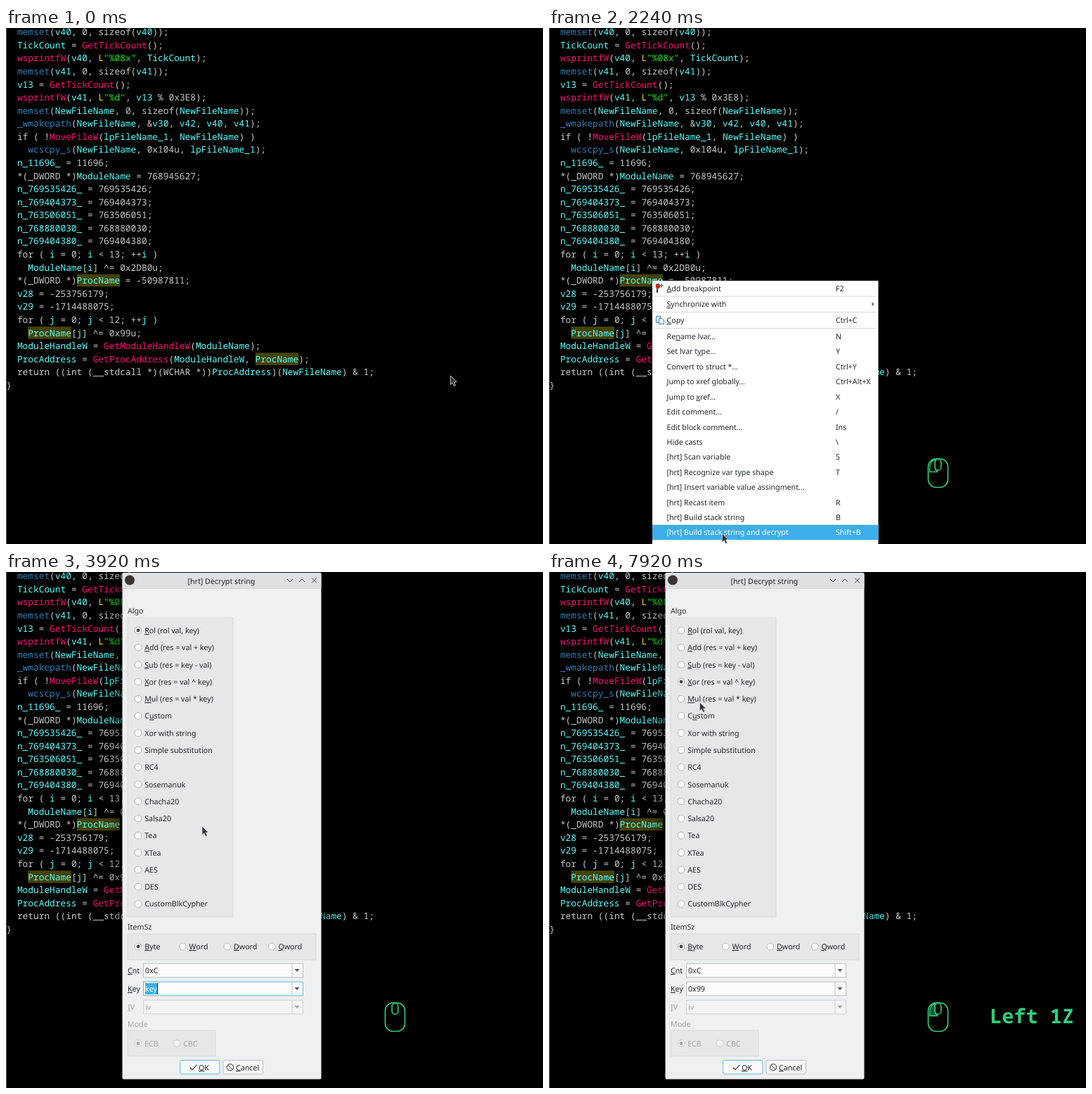
Write an HTML page that moves like this. It is 764 px wide and 733 px high and loops after 8 s.

```html
<!DOCTYPE html>
<html lang="en">
<head>
<meta charset="utf-8">
<title>Decrypt a stack string</title>
<style>
html, body { margin: 0; width: 100%; height: 100%; overflow: hidden; background: #000; }
svg { display: block; }
text { white-space: pre; font: 10.66px "Noto Sans", sans-serif; text-rendering: geometricPrecision; }
.code { font: 12.84px "Noto Sans Mono", monospace; }
.keys { font: bold 28.5px "Noto Sans Mono", monospace; }
.u { text-decoration: underline; }
.win { filter: drop-shadow(0 4px 12px rgba(0, 0, 0, .9)); }
</style>
</head>
<body>
<svg id="stage" width="764" height="733" viewBox="0 0 764 733"></svg>
<script>
const LOOP = 8000, STEP = 80;
const INK = '#232629', DIM = '#a3a5a7', BLUE = '#3daee9', EDGE = '#62b9e8', GREEN = '#2fd07c';
const CHAR = 7.704, LINE = 18.58, BASE = 10.2, LEFT = 0.5;

const source = `  memset(v40, 0, sizeof(v40));
  TickCount = GetTickCount();
  wsprintfW(v40, L"%08x", TickCount);
  memset(v41, 0, sizeof(v41));
  v13 = GetTickCount();
  wsprintfW(v41, L"%d", v13 % 0x3E8);
  memset(NewFileName, 0, sizeof(NewFileName));
  _wmakepath(NewFileName, &v30, v42, v40, v41);
  if ( !MoveFileW(lpFileName_1, NewFileName) )
    wcscpy_s(NewFileName, 0x104u, lpFileName_1);
  n_11696_ = 11696;
  *(_DWORD *)ModuleName = 768945627;
  n_769535426_ = 769535426;
  n_769404373_ = 769404373;
  n_763506051_ = 763506051;
  n_768880030_ = 768880030;
  n_769404380_ = 769404380;
  for ( i = 0; i < 13; ++i )
    ModuleName[i] ^= 0x2DB0u;
  *(_DWORD *)ProcName = -50987811;
  v28 = -253756179;
  v29 = -1714488075;
  for ( j = 0; j < 12; ++j )
    ProcName[j] ^= 0x99u;
  ModuleHandleW = GetModuleHandleW(ModuleName);
  ProcAddress = GetProcAddress(ModuleHandleW, ProcName);
  return ((int (__stdcall *)(WCHAR *))ProcAddress)(NewFileName) & 1;
}`;

const esc = s => s.replace(/&/g, '&amp;').replace(/</g, '&lt;');
const rect = (x, y, w, h, fill, more = '') =>
  `<rect x="${x}" y="${y}" width="${w}" height="${h}" fill="${fill}" ${more}/>`;
const path = (d, stroke, more = '') =>
  `<path d="${d}" fill="none" stroke="${stroke}" ${more}/>`;
const group = (id, body, more = '') => `<g id="${id}" ${more}>${body}</g>`;

// "&" marks the underlined letter
const label = (x, y, s, fill = INK, more = '') =>
  `<text x="${x}" y="${y}" ${fill ? `fill="${fill}"` : ''} ${more}>` +
  s.replace(/&(.)/, '<tspan class="u">$1</tspan>') + '</text>';

function tokenColor(tok) {
  if (/^(memset|_wmakepath|wcscpy_s)$/.test(tok)) return '#2980b9';
  if (/^(Get|Move|wsprintf)/.test(tok)) return '#ff0a78';
  if (/^(sizeof|if|for|return|int|__stdcall|WCHAR|_DWORD)$/.test(tok)) return '#c8c8c8';
  if (tok === 'L') return '#f5d020';
  if (tok[0] === '"') return '#12e812';
  return /^[A-Za-z_]/.test(tok) ? '#55ffff' : '#c8c8c8';
}

function listing() {
  return source.split('\n').map((line, n) => {
    const y = BASE + n * LINE;
    const col = line.indexOf('ProcName');
    const mark = col < 0 ? '' : rect(LEFT + col * CHAR, y - 13.4, 8 * CHAR, 17.6, '#434300');
    const spans = line.match(/"[^"]*"|\w+|[^\w"]+/g)
      .map(tok => `<tspan fill="${tokenColor(tok)}">${esc(tok)}</tspan>`).join('');
    return `${mark}<text class="code" x="${LEFT}" y="${y.toFixed(2)}">${spans}</text>`;
  }).join('');
}

const items = [
  ['&Add breakpoint', 'F2'], ['&Synchronize with', ''], ['&Copy', 'Ctrl+C'],
  ['Re&name lvar...', 'N'], ['Set lvar t&ype...', 'Y'], ['Convert to struct *...', 'Ctrl+Y'],
  ['Jump to xref globally...', 'Ctrl+Alt+X'], ['Jump to &xref...', 'X'],
  ['Edit comment...', '/'], ['Edit block comment...', 'Ins'], ['Hide casts', '\\'],
  ['[hrt] Scan variable', 'S'], ['[hrt] Recognize var type shape', 'T'],
  ['[hrt] Insert variable value assingment...', ''], ['[hrt] Recast item', 'R'],
  ['[hrt] Build stack string', 'B'], ['[hrt] Build stack string and decrypt', 'Shift+B']
];
const itemY = i => 369.5 + (i < 3 ? i * 22.8 : 68.5 + (i - 3) * 21.42);

function menu() {
  const rows = items.map(([name, key], i) =>
    group('row' + i, label(167.5, itemY(i) + 4, name, '') + label(408, itemY(i) + 4, key, ''))).join('');
  const lines = [381.2, 403.8, 426.6].map(y => path(`M150 ${y}H465`, '#d4d6d7')).join('');
  const icons = path('M154 369V376', '#333', 'stroke-width="2"') +
    '<circle cx="155" cy="366.5" r="3.4" fill="#c62828"/>' +
    path('M157.5 366H163M160.2 363.3V368.8', '#2e9b3f', 'stroke-width="1.5"') +
    path('M152.5 409.5H158.5V418.5H152.5Z', '#2a80b9') +
    '<path d="M156.5 412.5H161L163.5 415V420.5H156.5Z" fill="#fff" stroke="#2a80b9"/>' +
    '<path d="M459.5 389L463 392.3L459.5 395.6Z" fill="#777"/>';
  return group('menu', rect(147, 359, 321.5, 380, '#fff') +
    rect(147, 0, 321.5, 21.4, BLUE, 'id="hover"') + lines + icons + rows);
}

const ring = (x, y, off) =>
  `<circle cx="${x}" cy="${y}" r="4.9" fill="${off ? '#eff0f1' : '#fcfcfc'}" stroke="${off ? '#c9cbcc' : '#aeb0b2'}" stroke-width=".9"/>`;
const dot = (x, y, color = '#3f4346', id = '') =>
  `<circle ${id} cx="${x}" cy="${y}" r="2.4" fill="${color}"/>`;
const radio = (x, y, s, off) => ring(x, y, off) + label(x + 9.2, y + 4, s, off ? DIM : INK);
const box = (x, y, w, h) => rect(x, y, w, h, '#e5e7e8', 'stroke="#d3d6d8" stroke-width=".8"');

function frame(x, y, w, h, title, tx) {
  const r = x + w, m = y + 11;
  return rect(x, y, w, h, '#eff0f1', 'rx="2" class="win"') +
    rect(x, y, w, 22.5, '#dee0e2', 'rx="2"') +
    path(`M${x} ${y + 22.5}H${r}`, '#cfd2d4', 'stroke-width=".8"') +
    `<circle cx="${x + 10.5}" cy="${m - .5}" r="7" fill="#3a3433"/>` +
    label(tx, y + 15.5, title) +
    path(`M${r - 48.5} ${m - 2}l4 4l4 -4M${r - 31.5} ${m + 2}l4 -4l4 4` +
      `M${r - 13.5} ${m - 3.5}l7 7m0 -7l-7 7`, '#3b3f43');
}

function buttons(y) {
  return rect(247.7, y, 56.3, 19.6, '#fafafa', `rx="2" stroke="${EDGE}"`) +
    rect(309, y, 56.5, 19.6, '#f6f7f7', 'rx="2" stroke="#bcbebf"') +
    path(`M262 ${y + 10.5}l3 3l6.5 -7`, INK, 'stroke-width="1.1"') +
    label(274, y + 14, '&OK') +
    `<circle cx="319" cy="${y + 10}" r="4.6" fill="none" stroke="${INK}"/>` +
    path(`M315.8 ${y + 6.8}l6.4 6.4`, INK) + label(327, y + 14, '&Cancel');
}

function sizeDialog() {
  return group('size', frame(240, 210, 133.5, 141.5, '[hrt] ?', 289) +
    label(247.5, 251.5, 'char size?') + box(248, 258, 118, 62) +
    radio(263, 276.5, '&Byte') + radio(263, 300.7, '&Word') +
    dot(263, 276.5) + buttons(324.5));
}

function combo(y, name, value, off, ids = ['', '']) {
  const edge = off ? '#d0d2d3' : '#bcbebf';
  return label(173, y + 4, name, off ? DIM : INK) +
    rect(195.5, y - 9.8, 227, 19.6, off ? '#f3f4f4' : '#fcfcfc', `${ids[0]} stroke="${edge}"`) +
    path(`M407 ${y - 10}v20`, edge) +
    `<path d="M410.5 ${y - 2}h7l-3.5 4z" fill="${off ? DIM : '#55595c'}"/>` +
    (ids[1] ? rect(198, y - 8, 17, 16, BLUE, 'id="pick"') : '') +
    label(198, y + 4, value, off ? DIM : INK, ids[1]);
}

const algoY = i => 83 + i * 24.28;
function decryptDialog() {
  const algos = ['&Rol (rol val, key)', '&Add (res = val + key)', '&Sub (res = key - val)',
    '&Xor (res = val ^ key)', '&Mul (res = val * key)', 'C&ustom', 'Xor with string',
    'Simple substitution', 'RC4', 'Sosemanuk', 'Chacha20', 'Salsa20', 'Tea', 'XTea',
    'AES', 'DES', 'CustomBlkCypher'];
  const sizes = ['&Byte', '&Word', '&Dword', '&Qword'];
  return group('decrypt', frame(165.5, 1, 283, 719.5, '[hrt] Decrypt string', 258.5) +
    label(173, 58.5, 'Algo') + box(173, 65, 150, 425) +
    algos.map((s, i) => radio(188, algoY(i), s)).join('') + dot(188, 83, '#3f4346', 'id="algo"') +
    label(173, 507.5, 'ItemSz') + box(173, 514, 268, 37) +
    sizes.map((s, i) => radio(188 + i * 63.4, 532, s)).join('') + dot(188, 532) +
    combo(566, '&Cnt', '0xC') +
    combo(592, '&Key', 'key', false, ['id="field"', 'id="value"']) +
    combo(618, '&IV', 'iv', true) +
    rect(198, 584, 1, 16, INK, 'id="caret"') +
    label(173, 645.5, 'Mode', DIM) + box(173, 651, 125, 37) +
    radio(188, 669.7, 'ECB', true) + radio(243, 669.7, 'CBC', true) + dot(188, 669.7, DIM) +
    buttons(693.5) +
    group('popup', rect(195.5, 602, 227, 17, '#fcfcfc', 'stroke="#bcbebf"') +
      label(198, 614, '0x99', '#4a4d50')) +
    group('tip', rect(285, 598, 211, 18, '#c4c4c4', 'stroke="#8c8c8c" stroke-width=".8"') +
      label(288, 611, "value, address (name), 'string', hex-string", '#606060'), 'opacity=".6"'));
}

function mouseHint() {
  const side = d => `M${553.5 + d} 613.5 C${553.5 + d * 2.6} 614 ${553.5 + d * 3} 620 ` +
    `${553.5 + d * 3} 630.5 H${553.5 + d * .3} V629 Q${553.5 + d} 629 ${553.5 + d} 624Z`;
  const pads = [['L', -4], ['R', 4]].map(([n, d]) =>
    `<path id="fill${n}" d="${side(d)}" fill="#155a35"/>` +
    path(side(d), GREEN, `id="edge${n}" stroke-width="1.3"`)).join('');
  return group('mouse', pads +
    rect(539.5, 612, 28, 40.5, 'none', `rx="11" stroke="${GREEN}" stroke-width="1.6"`) +
    rect(549.2, 612.5, 8.6, 15.8, '#000', `rx="4.3" stroke="${GREEN}" stroke-width="1.6"`));
}

document.getElementById('stage').innerHTML =
  rect(0, 0, 764, 733, '#000') + rect(0, 0, 1, 733, '#5c5c5c') + listing() +
  menu() + sizeDialog() + decryptDialog() + mouseHint() +
  `<text id="typed" class="keys" x="687" y="641" text-anchor="middle" fill="${GREEN}"></text>` +
  rect(0, 642, 17, 1.6, GREEN, 'id="under"') +
  group('arrow', '<path d="M.3 1V13.6L3.2 11L5.3 15.6L7.7 14.5L5.6 10.1L9.3 9.7Z" fill="#31363b" stroke="#e8e8e8" stroke-width=".8" stroke-linejoin="round"/>') +
  group('beam', path('M-2.5 -6.5H-.5L0 -6L.5 -6.5H2.5M0 -6V6M-2.5 6.5H-.5L0 6L.5 6.5H2.5', '#31363b'));

const el = {};
document.querySelectorAll('[id]').forEach(e => el[e.id] = e);

const moves = [[40, 632, 493], [560, 116, 350], [720, 146, 358], [920, 146, 358],
  [1760, 241, 708], [1920, 246, 717], [2400, 246, 717], [3040, 262, 356], [3360, 278, 334],
  [3800, 278, 334], [4400, 284, 585], [5440, 284, 585], [5680, 270, 584], [6480, 270, 584],
  [7280, 197, 160], [7520, 197, 160], [7840, 214, 184]];

// side, outline on, fill on, outline off, fill off
const presses = [['R', 800, 800, 880, 960], ['L', 2240, 2320, 2400, 2480],
  ['L', 3520, 3520, 3760, 3840], ['L', 7440, 7440, LOOP, LOOP]];

// time, field text, caret x, typed keys
const edits = [[0, 'key', 215, ''], [5120, '9', 204, '9'], [5280, '99', 210, '99'],
  [5520, '99', 198, 'Left'], [6320, '099', 204, 'Left 1'], [6480, '0x99', 210, 'Left 1Z']];

const within = (t, a, b) => t >= a && t < b;
const show = (e, on) => e.setAttribute('visibility', on ? 'inherit' : 'hidden');
const ramp = (t, a, d) => Math.max(0, Math.min(1, (t - a) / d));
const fade = (e, t, a, b, d) => {
  e.setAttribute('opacity', Math.min(ramp(t, a, d), 1 - ramp(t, b, d)));
};

function pointer(t) {
  const n = moves.findIndex(m => m[0] > t);
  if (n < 1) return moves[n ? moves.length - 1 : 0].slice(1);
  const [a, x, y] = moves[n - 1], [b, x2, y2] = moves[n];
  const p = (t - a) / (b - a), k = p * p * (3 - 2 * p);
  return [x + (x2 - x) * k, y + (y2 - y) * k];
}

function draw(t) {
  const [x, y] = pointer(t);
  const beam = within(t, 4320, 6480);
  show(el.arrow, !beam);
  show(el.beam, beam);
  (beam ? el.beam : el.arrow).setAttribute('transform', `translate(${x} ${y})`);

  fade(el.menu, t, 720, 2320, 160);
  const over = x > 150 && t > 900 ? items.findIndex((_, i) => Math.abs(y - itemY(i)) < 11.4) : -1;
  show(el.hover, over >= 0);
  if (over >= 0) el.hover.setAttribute('y', itemY(over) - 10.7);
  items.forEach((_, i) => el['row' + i].setAttribute('fill', i === over ? '#fff' : INK));

  fade(el.size, t, 2480, 3760, 160);
  fade(el.decrypt, t, 3760, LOOP, 160);

  show(el.mouse, t >= presses[0][1]);
  for (const n of ['L', 'R']) {
    const mine = presses.filter(p => p[0] === n);
    show(el['edge' + n], mine.some(p => within(t, p[1], p[3])));
    show(el['fill' + n], mine.some(p => within(t, p[2], p[4])));
  }

  const [since, value, caretX, typed] = edits.filter(e => e[0] <= t).pop();
  const picked = !since, focus = t < 7440;
  el.value.textContent = value;
  el.value.setAttribute('fill', picked ? '#fff' : INK);
  show(el.pick, picked);
  el.field.setAttribute('stroke', focus ? EDGE : '#bcbebf');
  el.caret.setAttribute('x', caretX);
  show(el.caret, focus && (t - (since || 4280)) % 1040 < 520);

  el.typed.textContent = typed;
  el.under.setAttribute('x', 687 + typed.length * 8.55 - 17.1);
  show(el.under, typed && t - since < 480);

  fade(el.popup, t, 6400, 7360, 160);
  show(el.tip, within(t, 5040, 6640));
  el.algo.setAttribute('cy', algoY(t < 7520 ? 0 : 3));
}

const start = performance.now();
function tick(now) {
  const t = Math.max(0, now - start) % LOOP;
  draw(Math.floor(t / STEP) * STEP);
  requestAnimationFrame(tick);
}
draw(0);
requestAnimationFrame(tick);
</script>
</body>
</html>
```
